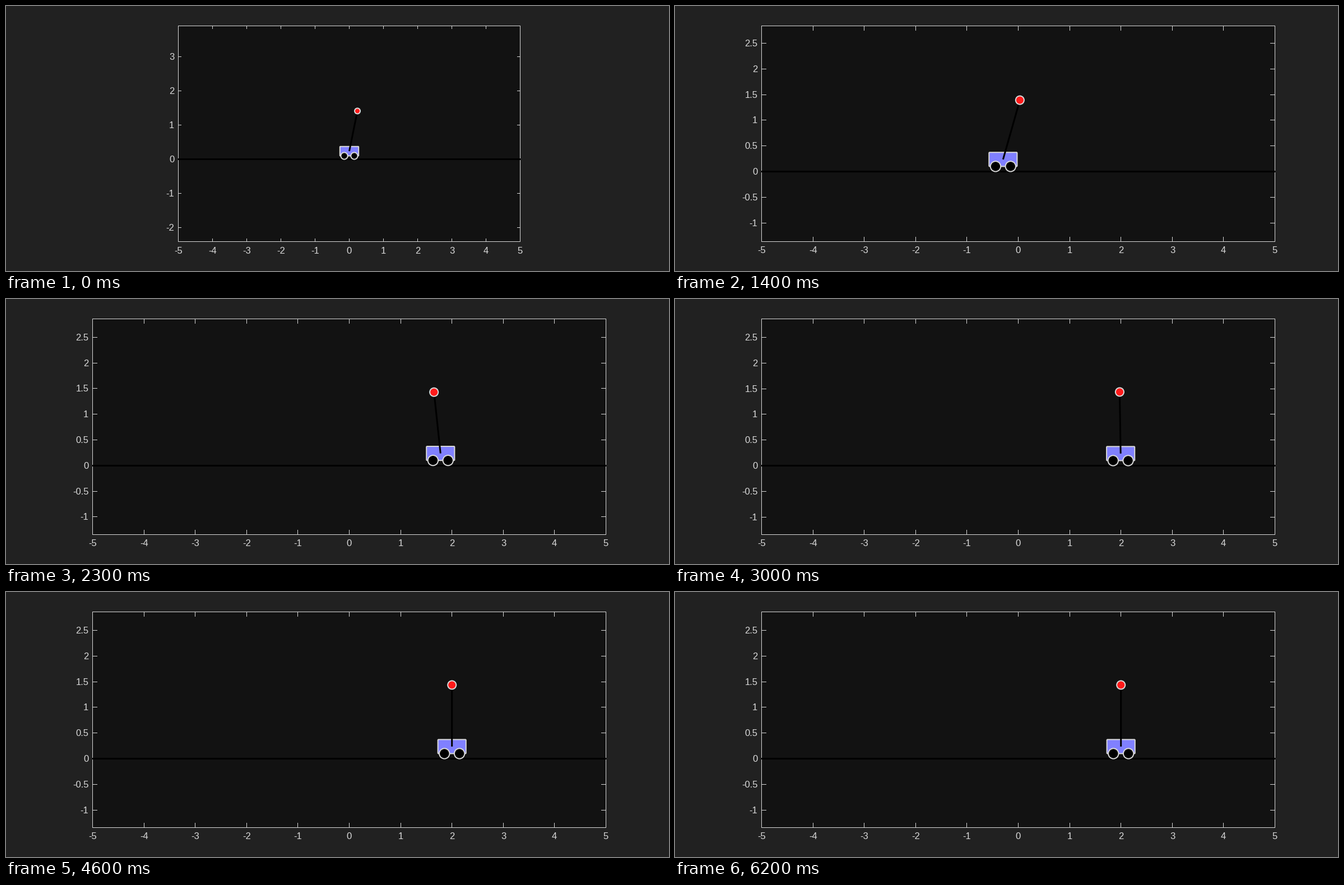
These frames come from a looping animation (1183x473 px, 6300 ms). A matplotlib script:

```python
import numpy as np
import matplotlib.pyplot as plt
from matplotlib.animation import FuncAnimation
from matplotlib.patches import Circle, FancyBboxPatch, Rectangle

W, H, DPI = 1183, 473, 100
FRAMES, INTERVAL = 63, 100
PX = 72 / DPI  # one pixel in points
FIG_BG, AX_BG, FG = "#212121", "#121212", "#d9d9d9"

# Axes box in pixels
MID_X, TOP, BOTTOM = 612.5, 35.5, 420.5
MID_Y = (TOP + BOTTOM) / 2
FONT_PX = 16.67

# Cart and pendulum
M, m, L, G = 1.5, 0.3, 1.2, 10.0
CART_W = np.sqrt(M / 5)
CART_H = CART_W / 2
WHEEL_R = 0.1
BOB_R = 0.15 * np.sqrt(m)
PIVOT = WHEEL_R + CART_H / 2

# Closed loop: the bob position and its three derivatives
POLES = [-3.162, -2.379 + 0.861j, -2.379 - 0.861j, -27.3]
THETA0 = 0.2
START = np.array([L * np.sin(THETA0), 0, G * THETA0, 0])
TARGET, T_STEP = 2.0, 2.111
DT, T_LAG = 0.164, 0.044

loop = np.eye(4, k=1)
loop[3] = -np.poly(POLES).real[:0:-1]
EIG, VEC = np.linalg.eig(loop)


def free(state, t):
    """Free response of the closed loop after time t."""
    return ((VEC * np.exp(EIG * t)) @ np.linalg.solve(VEC, state)).real


def pose(i):
    """Cart position and pendulum angle."""
    t = max(0, DT * i - T_LAG)
    s = free(START, t)
    if t > T_STEP:
        goal = np.array([TARGET, 0, 0, 0])
        s = s + goal - free(goal, t - T_STEP)
    theta = s[2] / G
    return s[0] - L * np.sin(theta), theta


fig = plt.figure(figsize=(W / DPI, H / DPI), dpi=DPI, facecolor=FIG_BG)
ax = fig.add_axes([0, 0, 1, 1])


def pixel(v):
    """Centre of the pixel that holds v."""
    return np.floor(v + 1e-6) + 0.5


def line(xs, ys, color=FG, width=1, z=2):
    ax.plot(xs, ys, color=color, lw=width * PX, zorder=z,
            solid_capstyle="butt", snap=False)


def label(x, y, value, ha):
    ax.text(x, y, f"{value:g}", color=FG, ha=ha, va="baseline",
            family="Liberation Sans", fontsize=FONT_PX * PX)


def draw_axes(scale, y_px, y_ticks, x_base):
    left, right = MID_X - 5 * scale, MID_X + 5 * scale
    tick = round(0.01 * (right - left)) - 0.5
    ax.add_patch(Rectangle((left, TOP), right - left, BOTTOM - TOP,
                           fc=AX_BG, ec=FG, lw=PX, zorder=1, snap=False))
    for v in range(-5, 6):
        x = pixel(MID_X + v * scale)
        line([x, x], [BOTTOM, BOTTOM - tick])
        line([x, x], [TOP, TOP + tick])
        label(x, x_base, v, "center")
    for v in y_ticks:
        y = pixel(y_px(v))
        line([left, left + tick], [y, y])
        line([right, right - tick], [y, y])
        label(left - 7, y + 5.5, v, "right")
    ground = pixel(y_px(0))
    line([left - 0.5, right + 0.5], [ground, ground], "black", 3, 3)


def disc(x, y, r, color, z):
    ax.add_patch(Circle((x, y), r, fc=color, ec=FG, lw=2 * PX, zorder=z))


def draw(i):
    ax.cla()
    ax.set_xlim(0, W)
    ax.set_ylim(H, 0)
    ax.axis("off")

    x, theta = pose(i)
    bob_x, bob_y = x + L * np.sin(theta), PIVOT + L * np.cos(theta)
    mid = (bob_y + BOB_R) / 2  # the view stays centred on the drawing

    # The very first view is still zoomed out
    if i == 0:
        scale, ticks, x_base = 61.0, np.arange(-2, 4), 442
    else:
        scale, ticks, x_base = 91.6, np.arange(-1, 2.6, 0.5), 441

    def x_px(v):
        return MID_X + v * scale

    def y_px(v):
        return MID_Y - (v - mid) * scale

    draw_axes(scale, y_px, ticks, x_base)

    corner = 0.05 * CART_H * scale
    ax.add_patch(FancyBboxPatch(
        (x_px(x - CART_W / 2), y_px(WHEEL_R + CART_H)),
        CART_W * scale, CART_H * scale,
        boxstyle=f"round,pad=0,rounding_size={corner}",
        fc=(0.5, 0.5, 1), ec=FG, lw=2 * PX, zorder=4))
    for side in (-1, 1):
        wx = x + side * (0.45 * CART_W - WHEEL_R)
        disc(x_px(wx), y_px(WHEEL_R), WHEEL_R * scale, "black", 5)
    line([x_px(x), x_px(bob_x)], [y_px(PIVOT), y_px(bob_y)], "black", 3, 6)
    disc(x_px(bob_x), y_px(bob_y), BOB_R * scale, (1, 0.1, 0.1), 7)
    return []


anim = FuncAnimation(fig, draw, frames=FRAMES, init_func=lambda: draw(0),
                     interval=INTERVAL, repeat=True, repeat_delay=0)
plt.show()
```
